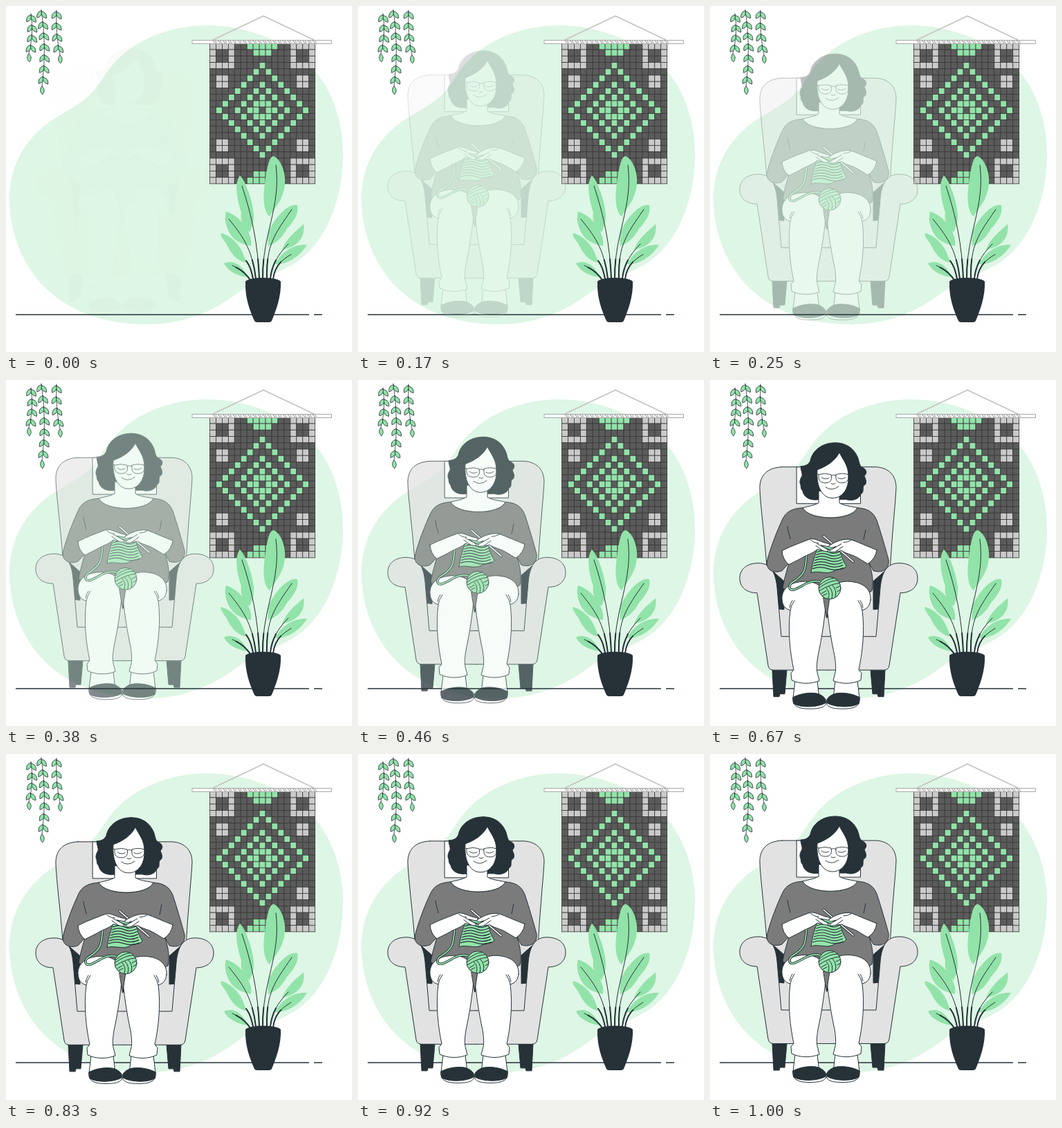
Animation of 500 by 500 pixels, one loop 1040 ms. Source, as an HTML page:

```html
<!DOCTYPE html>
<html lang="en">
<head>
<meta charset="utf-8">
<title>Knitting</title>
<style>
html, body { margin: 0; height: 100%; overflow: hidden; background: #fff; }
svg { display: block; width: 100%; height: 100%; }
.ink { stroke: #263238; stroke-width: 1; stroke-linecap: round; stroke-linejoin: round; }
.none { fill: none; }
.white { fill: #fff; }
.grey { fill: #e2e2e2; }
.wool { fill: #7b7b7b; }
.green { fill: #92e3a9; }
.dark { fill: #263238; }
</style>
</head>
<body>
<svg viewBox="0 0 500 500">
  <path fill="#def6e5" d="M290 28C345 28 400 48 438 85C470 115 487 165 487 215C487 270 468 330 430 362C405 384 365 393 340 411C305 437 265 460 203 460C140 460 85 440 48 398C20 365 5 322 5 278C5 235 25 195 62 168C85 152 109 143 128 121C139 109 146 88 175 65C208 40 250 28 290 28Z"/>
  <path fill="none" stroke="#263238" stroke-width="1.3" d="M14 446H438M445 446H457"/>

  <g id="vines" class="ink green" style="stroke-width:.8"></g>

  <path fill="none" stroke="#c4c4c4" stroke-width="1.7" d="M299 49L372 14.500L445 49"/>
  <g id="rug" stroke="#383838" stroke-width=".8"></g>
  <path fill="#fff" stroke="#a6a6a6" stroke-width="1" d="M269 49.500H470.500V54.500H269Z"/>
  <path id="loops" fill="none" stroke="#a6a6a6" stroke-width="1.100"/>

  <g class="green">
    <path d="M386 217C396 219 405 240 403 258C400 282 388 292 381 304C374 299 371 284 373 265C376 245 378 219 386 217Z"/>
    <path d="M338 245C346 252 356 280 358 300C359 315 354 321 352 327C344 320 338 312 340 298C336 285 328 258 338 245Z"/>
    <path d="M318 297C330 300 342 311 349 324C354 334 355 340 354 347C344 345 332 341 325 331C317 320 315 305 318 297Z"/>
    <path d="M421 288C424 300 415 312 406 322C399 335 390 343 379 347C378 335 378 325 386 314C395 300 410 285 421 288Z"/>
    <path d="M430 315C420 325 406 334 399 352C415 350 434 338 430 315Z"/>
    <path d="M435 345C417 344 401 352 388 373C405 374 424 363 435 345Z"/>
    <path d="M311 328C325 332 341 345 347 371C332 368 324 355 318 343C314 337 309 332 311 328Z"/>
    <path d="M315 372C325 367 341 371 349 392C335 390 321 384 315 372Z"/>
  </g>
  <g id="stems" class="none" stroke="#263238" stroke-linecap="round">
    <path d="M366 394C364 345 356 305 341 260M371 394C370 330 398 290 390 230"/>
    <path d="M361 394C356 350 340 330 322 308M377 394C376 345 388 330 413 294M382 394C384 375 392 360 408 344"/>
    <path d="M357 394C354 380 352 375 347 368M386 395C388 378 395 369 412 359M353 396C346 385 338 380 327 375"/>
  </g>
  <use href="#stems" stroke-width="2" stroke-dasharray="28 999"/>
  <path class="dark" d="M346 398C352 391 391 391 397 398C398 420 390 440 384 455Q383 457 380 457H363Q360 457 359 455C352 440 345 420 346 398Z"/>

  <g id="sitter" class="ink">
    <path class="grey" d="M104 125H240C258 126 269 137 269 155C267 190 262 230 259 300H84C81 240 74 195 72 158C71 140 80 126 104 125Z"/>
    <path class="white" d="M125.500 125H217.500V178H125.500Z"/>
    <path class="grey" stroke="none" d="M97 300H246V372H97Z"/>
    <g id="side">
      <path class="dark" d="M90 275L107 290V331L97 330Z"/>
      <path class="dark" d="M90 418L92 457H100L101 453H108L111 418Z"/>
      <path class="grey" d="M172 370H103L97 300C95 278 88 264 70 264C54 264 43 272 43 286C43 298 52 307 68 307L84 412Q85 418.500 92 418.500H172"/>
    </g>
    <use href="#side" transform="matrix(-1 0 0 1 343 0)"/>

    <path class="wool" d="M134 184C144 203 204 203 213 184C228 185 236 190 241 202C247 220 254 244 258 259C260 273 248 279 236 275L229 262C234 275 237 290 234 304Q220 316 190 312L174 315L169 343L163 315Q125 315 105 300C107 288 110 278 114 264L104 275C91 280 79 273 83 259C88 240 97 217 105 200C110 190 118 185 134 184Z"/>
    <path class="none" d="M112 211C113 220 115 223 116 229M225 216L222 230"/>

    <g id="leg">
      <path class="white" d="M123 434L120 459L158 460L155 434Z"/>
      <path class="white" d="M120 458C118 471 128 474.500 144 474.500C160 474.500 168 472 168 464C167 458 163 456 157 454Z"/>
      <path class="dark" d="M120 458C130 452 147 450 157 453C164 456 168 461 167 466C155 473 130 473 121 467Z"/>
      <path class="white" d="M104 317C103 302 114 293 130 291C150 288 166 297 168 314C166 345 161 375 156 398C154 410 154 418 155 422L158 434C146 439 130 439 118 433L117 423L121 418C116 395 112 362 116 332C108 330 105 325 104 317Z"/>
      <path class="none" d="M122 318Q117 325 116 332M119 318Q116 322 115 328"/>
    </g>
    <use href="#leg" transform="matrix(-1 0 0 1 336 0)"/>
    <path class="wool" d="M164 314H173L168.500 343Z"/>

    <path class="dark" d="M181 90C162 90 148 101 145 116C143 121 138 124 131 124C131 130 134 134 133 138C130 143 129 147 131 151Q131 157 134 160C136 170 146 174 158 172L197 172C206 175 216 171 218 164C223 162 220 156 222 152C228 149 225 143 223 138C228 133 226 128 219 125C215 121 216 117 213 110C207 97 196 90 181 90Z"/>
    <path class="white" d="M157 160V177C150 181 140 182 134 184C144 203 204 203 213 184C204 182 193 181 187 177V160Z"/>
    <path class="white" d="M155 129C169 124 181 116 187 104C192 115 200 122 200 138C201 157 191 170 177 170C163 170 153 155 155 129Z"/>
    <g class="none" style="stroke-width:.9">
      <path d="M152 133L157 136Q166 133 175 136C177 145 173 148 167 148C160 148 156 145 157 136M182 136Q191 133 200 136C201 145 197 148 191 148C184 148 181 145 182 136M175 138Q178 135 182 138"/>
      <path d="M161 140Q166 144 172 141M185 141Q191 144 196 140M175 149Q178 151 181 149M167 154Q176 161 186 153"/>
    </g>

    <g class="none">
      <path id="yarn" stroke-width="3.200" d="M141 238C139 255 139 268 136 275C130 290 113 290 115 300C118 307 130 298 140 293Q150 288 160 291"/>
      <use href="#yarn" class="strand"/>
      <path style="stroke:#92e3a9;stroke-width:1.700" d="M141 238C139 255 139 268 136 275C130 290 113 290 115 300C118 307 130 298 140 293Q150 288 160 291"/>
    </g>
    <circle class="green" cx="173" cy="300" r="16"/>
    <path class="none" d="M158 296Q170 286 179 286M157 300Q172 289 184 289M158 304Q174 294 187 293M168 300Q174 306 171 315M172 298Q179 305 176 315M177 296Q184 303 181 313M161 308L168 304M163 311L169 308M182 300L188 297M184 305L189 302"/>

    <path class="green" d="M156 240C165 237 178 237 186 240C190 250 190 258 197 268C192 276 185 270 178 276C168 281 156 274 146 278C148 262 152 252 156 240Z"/>
    <path id="rows" class="none" style="stroke-width:1.200"/>
    <path class="white" d="M104 246C118 239 132 234 145 229C153 228 160 234 172 236Q175 239 170 240L160 238L171 245Q171 248 167 247L155 244C149 250 139 252 130 258L114 266Q105 259 104 246Z"/>
    <path class="none" d="M155 236L166 242M153 239L163 246M145 230Q150 235 157 235"/>
    <path class="none" style="stroke-width:3.400" d="M164 225L207 262"/>
    <path class="none" style="stroke:#fff;stroke-width:1.600" d="M164 225L207 262"/>
    <path class="white" d="M241 245C228 240 215 234 204 230C194 228 182 232 172 239Q171 242 175 242L182 240L173 246Q174 249 178 248L190 246C198 251 207 252 213 256L228 265Q239 258 241 245Z"/>
    <path class="none" d="M190 236L178 243M192 240L182 247M204 231Q198 234 193 234"/>
  </g>
</svg>
<script>
const $ = id => document.getElementById(id);
const PERIOD = 1040, FPS = 24, DROP = 30;

function drawRug() {
  const cols = 17, rows = 22, left = 294.5, top = 53.8, w = 8.95, h = 9.23;
  const colour = (c, r) => {
    const x = Math.abs(c - 8), y = Math.abs(r - 10);
    const edge = Math.min(r, rows - 1 - r), side = 8 - x;
    if (side < 4 && edge < 4 && !(side % 3 && edge % 3)) return '#cacaca';
    if ((side === 1 || side === 2) && (edge === 5 || edge === 6)) return '#cacaca';
    if (edge < 2 && x <= 2 - edge) return '#92e3a9';
    if ([1, 2, 4, 7].includes(x + y)) return '#92e3a9';
    return '#5b5b5b';
  };
  let cells = '';
  for (let r = 0; r < rows; r++)
    for (let c = 0; c < cols; c++)
      cells += `<rect x="${left + c * w}" y="${top + r * h}" width="${w}" height="${h}" fill="${colour(c, r)}"/>`;
  $('rug').innerHTML = cells;
  let loops = '';
  for (let x = 299; x < 445; x += 7.2) loops += `M${x} 50l4 4M${x + 3} 49.500l3 4`;
  $('loops').setAttribute('d', loops);
}

// Hanging stem, bowed sideways, with drooping leaf pairs and one leaf at the tip.
function vine(x, y, dx, bow, length, pairs) {
  const leaf = (px, py, turn) =>
    `<path transform="translate(${px} ${py}) rotate(${turn})" d="M0 0C4 4 3.500 8 0 12C-3.500 8 -4 4 0 0"/>`;
  const stem = length - 12, at = k => [x + dx * k + bow * 4 * k * (1 - k), y + stem * k];
  const [ex, ey] = at(1);
  let out = `<path class="none" d="M${x} ${y}Q${x + dx / 2 + bow * 2} ${y + stem / 2} ${ex} ${ey}"/>`;
  for (let i = 0; i < pairs; i++) {
    const [px, py] = at((i + .12) / pairs);
    out += leaf(px, py, 32) + leaf(px, py + 1, -36);
  }
  return out + leaf(ex, ey, -4);
}

function drawRows() {
  let d = '';
  for (let i = 0; i < 8; i++) {
    const y = 244 + i * 4, left = 156 - i * 1.1, w = 31 + i * 1.9;
    d += `M${left} ${y}q${w / 4} -4 ${w / 2} 0t${w / 2} -1`;
  }
  $('rows').setAttribute('d', d);
}

// Easing curve (.36, -.01) (.5, 1.38), which overshoots before settling.
function ease(x) {
  const curve = (s, a, b) => 3 * (1 - s) * (1 - s) * s * a + 3 * (1 - s) * s * s * b + s ** 3;
  let lo = 0, hi = 1;
  for (let i = 0; i < 24; i++) {
    const mid = (lo + hi) / 2;
    if (curve(mid, .36, .5) < x) lo = mid; else hi = mid;
  }
  return curve(lo, -.01, 1.38);
}

function draw(t) {
  const tick = Math.floor((t + 5) * FPS / 1000);
  const p = ease(Math.min(1, ((tick < 2 ? .5 : tick) + 1) / FPS));
  $('sitter').setAttribute('transform', `translate(0 ${DROP * (p - 1)})`);
  $('sitter').setAttribute('opacity', Math.min(1, p));
}

drawRug();
drawRows();
$('vines').innerHTML = vine(36, 11, -3, 3, 70, 4) + vine(51, 5, 1, 4, 123, 7) + vine(73, 6, 5, -2, 77, 4);

const start = performance.now();
function loop() {
  draw((performance.now() - start) % PERIOD);
  requestAnimationFrame(loop);
}
loop();
</script>
</body>
</html>
```
